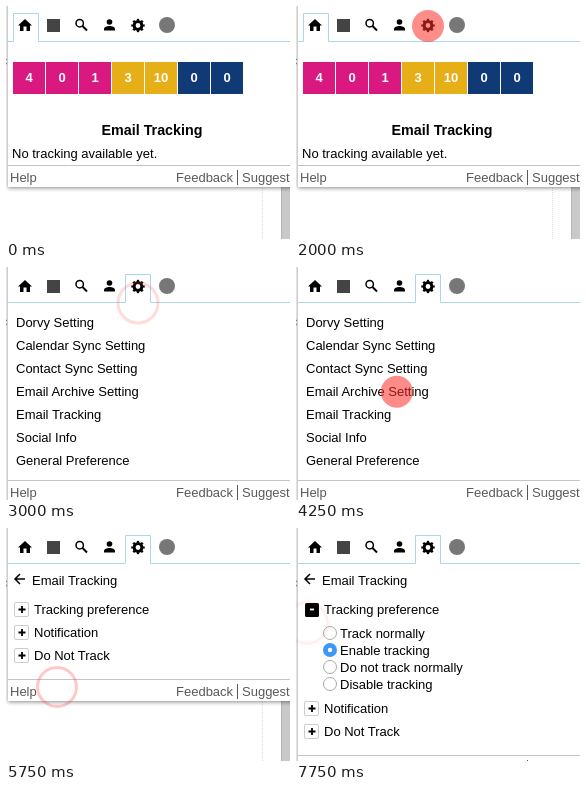
Write an HTML page that moves like this. It is 284 px wide and 233 px high and loops after 8000 ms.

```html
<!DOCTYPE html>
<html lang="en">
<head>
<meta charset="utf-8">
<title>Tracking settings</title>
<style>
  html, body { margin: 0; width: 100%; height: 100%; overflow: hidden; background: #fff; }
  svg { display: block; width: 284px; height: 233px; font: 13px "Liberation Sans", Arial, sans-serif; }
  .panel { fill: #fff; filter: drop-shadow(0 1px 2px #0007); }
  .bold { font-weight: bold; text-anchor: middle; }
  .line { fill: none; stroke: #000; }
</style>
</head>
<body>
<svg id="stage" viewBox="0 0 284 233"></svg>
<script>
const LOOP = 8000, STEP = 250;
const stage = document.getElementById('stage');

const text = (x, y, s, attrs = '') => `<text x="${x}" y="${y}" ${attrs}>${s}</text>`;
const rect = (x, y, w, h, fill, attrs = '') =>
  `<rect x="${x}" y="${y}" width="${w}" height="${h}" fill="${fill}" ${attrs}/>`;
const circle = (x, y, r, attrs = '') => `<circle cx="${x}" cy="${y}" r="${r}" ${attrs}/>`;
const path = (d, attrs = '') => `<path d="${d}" ${attrs}/>`;
const list = (items, draw) => items.map(draw).join('');

const icons =
  path('M12 19.5L19 13L26 19.5H24V25H20.5V20.5H17.5V25H14V19.5Z') +
  rect(41, 13, 13, 13, '#444') +
  circle(73.7, 17.2, 3.7, 'class="line" stroke-width="1.5"') +
  path('M76.5 20L81 24.5', 'class="line" stroke-width="2"') +
  circle(103.5, 16, 2.8) + path('M98 24.5V23C98 19 109 19 109 23V24.5Z') +
  circle(132, 19.5, 3.9, 'class="line" stroke-width="3"') +
  circle(132, 19.5, 5.7, 'class="line" stroke-width="2" pathLength="16" stroke-dasharray="1 1" stroke-dashoffset=".5"') +
  circle(161, 19, 8, 'fill="#777"');

const backdrop =
  path('M256.5 0V233', 'stroke="#ddd" stroke-dasharray="1 1"') +
  rect(275, 0, 9, 233, '#c9c9c9') + rect(275, 0, 1, 233, '#b5b5b5') +
  text(-5, 20, '/', 'fill="#888"') + text(-5, 59, 'c', 'fill="#888"');

// White panel with the icon bar, the selected tab and the footer at y
function frame(tabX, y) {
  return backdrop + rect(2, -5, 300, y + 27, '#fff', 'class="panel"') +
    path(`M2 35.5H${tabX}.5V7.5H${tabX + 25}.5V35.5H284`, 'fill="none" stroke="#a9d9e6"') +
    icons + rect(2, y, 282, 1, '#c4c4c4') +
    `<g fill="#595959">${text(4, y + 17, 'Help')}${text(170, y + 17, 'Feedback')}${text(236, y + 17, 'Suggest')}</g>` +
    rect(231, y + 5, 1, 15, '#595959');
}

function home() {
  const color = i => i < 3 ? '#d9197f' : i < 5 ? '#e6ae17' : '#0f3a75';
  return frame(7, 159) +
    list([4, 0, 1, 3, 10, 0, 0], (n, i) => rect(7 + 33 * i, 56, 32, 32, color(i)) +
      text(23 + 33 * i, 76, n, 'class="bold" fill="#fff"')) +
    text(146, 129, 'Email Tracking', 'class="bold" font-size="14.3"') +
    text(6, 152, 'No tracking available yet.');
}

function menu() {
  const items = ['Dorvy Setting', 'Calendar Sync Setting', 'Contact Sync Setting',
    'Email Archive Setting', 'Email Tracking', 'Social Info', 'General Preference'];
  return frame(119, 213) + list(items, (s, i) => text(10, 60 + 23 * i, s));
}

function section(y, label, dark, open) {
  const box = dark ? rect(9, y - 7, 14, 14, '#000', 'rx="1.5"')
    : rect(8.5, y - 7.5, 14, 14, '#fff', 'rx="1.5" stroke="#ccc"');
  const sign = open ? 'M14 0H18' : 'M12.5 0H19.5M16 -3.5V3.5';
  return box + text(28, y + 4, label) +
    path(sign, `transform="translate(0 ${y - .5})" stroke="${dark ? '#fff' : '#000'}" stroke-width="1.8"`);
}

function radio(y, label, checked) {
  return circle(34, y, checked ? 7 : 6.5, checked ? 'fill="#3b97fb"' : 'fill="#fff" stroke="#aaa"') +
    (checked ? circle(34, y, 2.2, 'fill="#fff"') : '') + text(44, y + 5, label);
}

function tracking(open, hovered) {
  const shift = open ? 76 : 0;
  const options = ['Track normally', 'Enable tracking', 'Do not track normally', 'Disable tracking'];
  return frame(119, 151 + shift) +
    path('M19 51H9.5M14 46L9 51L14 56', 'class="line" stroke-width="1.5"') +
    text(26, 57, 'Email Tracking') +
    section(82, 'Tracking preference', open || hovered === 0, open) +
    (open ? list(options, (s, i) => radio(105 + 17 * i, s, i === 1)) : '') +
    section(105 + shift, 'Notification', hovered === 1) +
    section(128 + shift, 'Do Not Track');
}

// Each trip eases out to its goal (ease = power for x and y), then clicks
const trips = [
  { start: 500, end: 1000, click: 1000, from: [193, -6], to: [185, 16], ease: [3, 3] },
  { start: 1500, end: 2000, click: 2750, from: [157, 49], to: [132, 20], ease: [3, 3] },
  { start: 4000, end: 4750, click: 5750, from: [132, 30], to: [51, 143], ease: [1.2, 4.5] },
  { start: 6500, end: 7000, click: 7250, from: [46, 119], to: [11, 79], ease: [3, 3] }
];

function pointer(t) {
  const trip = trips.findLast(({ start }) => start <= t);
  if (!trip) return '';
  const { start, end, click, from, to, ease } = trip;
  const left = Math.max(0, (end - t) / (end - start));
  const [x, y] = to.map((goal, i) => goal + (from[i] - goal) * left ** ease[i]);
  const phase = (t - click) / STEP;
  if (phase < 0 || phase > 2) return circle(x, y, 16, 'fill="rgba(253,45,38,.55)"');
  return circle(x, y + 16, 19.5 + phase / 2,
    `fill="none" stroke="rgba(255,60,50,${.28 - .1 * phase})" stroke-width="3"`);
}

function page(t) {
  if (t < 3000) return home();
  if (t < 5750) return menu();
  const hovered = t < 6500 ? -1 : t < 6750 ? 1 : 0;
  return tracking(t >= 7500, hovered);
}

let shown = -1;
function draw() {
  const t = Math.floor(performance.now() % LOOP / STEP) * STEP;
  if (t !== shown) stage.innerHTML = page(t) + pointer(t);
  shown = t;
  requestAnimationFrame(draw);
}
draw();
</script>
</body>
</html>
```
